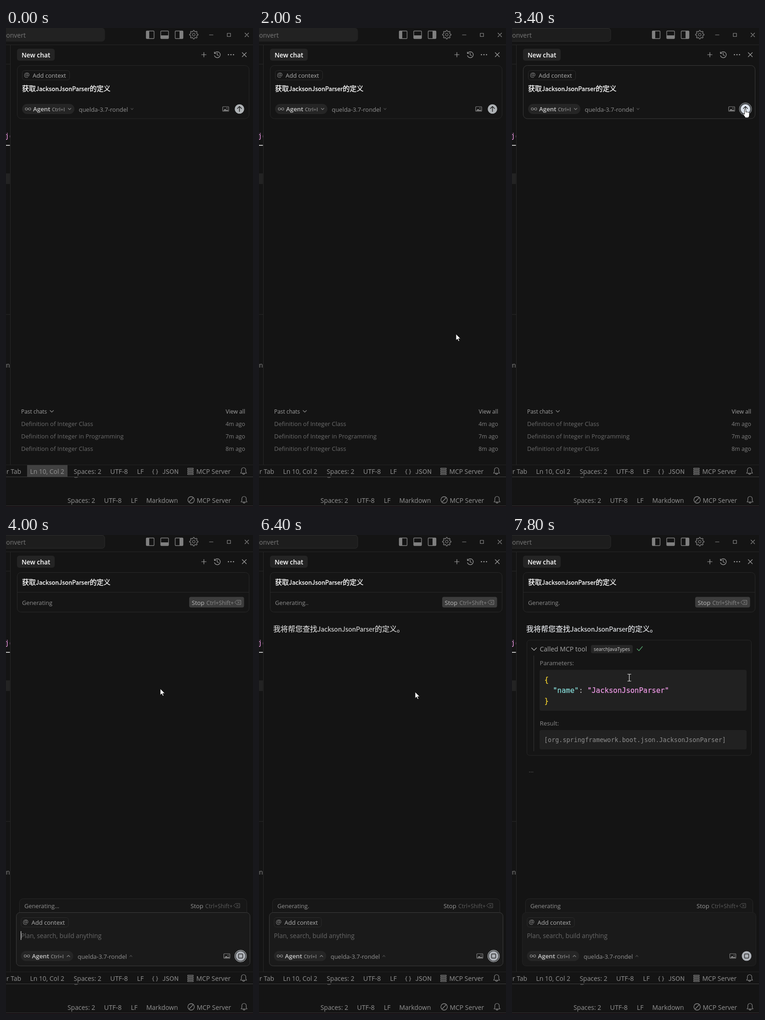
An HTML page for the animation above (8000 ms loop, 538x1041 px).

```html
<!DOCTYPE html>
<html lang="en">
<head>
<meta charset="utf-8">
<title>Agent chat</title>
<style>
html, body { margin: 0; width: 100%; height: 100%; overflow: hidden; background: #141414; }
svg { display: block; width: 538px; height: 1041px; }
text { font-family: "Open Sans", sans-serif; white-space: pre; }
.mono { font-family: "DejaVu Sans Mono", monospace; }
.cjk { font-family: "Noto Sans CJK SC", "Noto Sans CJK", sans-serif; }
.semi { font-weight: 600; }
.ico { fill: none; stroke: #8a8a8a; stroke-width: 1.2; stroke-linecap: round; stroke-linejoin: round; }
.dim { stroke: #747474; }
</style>
</head>
<body>
<svg id="stage" viewBox="0 0 538 1041" xmlns="http://www.w3.org/2000/svg"></svg>
<script>
const LOOP = 8000, STEP = 200;
const MODEL = 'quelda-3.7-rondel';

// Small markup helpers
const attrs = o => Object.entries(o).map(([k, v]) => ` ${k}="${v}"`).join('');
const text = (s, x, y, size, fill, more = {}) =>
  `<text x="${x}" y="${y}" font-size="${size}" fill="${fill}"${attrs(more)}>${s}</text>`;
const rect = (x, y, x2, y2, rx, fill, stroke = 'none', more = {}) =>
  `<rect x="${x}" y="${y}" width="${x2 - x}" height="${y2 - y}" rx="${rx}" fill="${fill}" stroke="${stroke}"${attrs(more)}/>`;
const path = (d, more = {}) => `<path class="ico" d="${d}"${attrs(more)}/>`;
const line = (d, stroke, width = 1) => `<path d="${d}" fill="none" stroke="${stroke}" stroke-width="${width}"/>`;
const group = (id, body) => `<g id="${id}">${body}</g>`;
// Chinese at the given size, Latin a little smaller
const mixed = (size, parts) => parts.map((s, i) =>
  `<tspan font-size="${i % 2 ? size * .87 : size}">${s}</tspan>`).join('');
const question = y => text(mixed(15, ['获取', 'JacksonJsonParser', '的定义']), 35, y, 15, '#fff',
  { class: 'cjk', stroke: '#fff', 'stroke-width': .3 });

const bell = (x, y) =>
  path(`M${x - 6.5} ${y + 5}h13l-1.700-3v-4.200a4.800 4.800 0 0 0-9.600 0v4.200zM${x - 2} ${y + 5.5}a2 2 0 0 0 4 0`);
const image = (x, y) =>
  rect(x - 6.5, y - 5, x + 6.5, y + 5, 1, 'none', '#888', { 'stroke-width': 1.2 }) +
  `<path d="M${x - 5.5} ${y + 4}l4-4.500 3 3 2-1.500 2.500 3z" fill="#888"/>` +
  `<circle cx="${x + 2.8}" cy="${y - 1.8}" r="1.100" fill="#888"/>`;
const erase = (x, y, color) =>
  path(`M${x + 4.5} ${y - 4.5}h8.500v9h-8.500l-4.500-4.500zM${x + 6} ${y - 2}l4 4m0-4l-4 4`, { style: `stroke:${color};stroke-width:1` });
const stopLabel = (x, y, main, soft) =>
  text('Stop', x, y, 13.1, main) + text('Ctrl+Shift+', x + 32, y, 12.2, soft) + erase(x + 94, y - 5, soft);
const chevron = (x, y, w, h, color) => path(`M${x - w} ${y - h}l${w} ${2 * h}l${w} ${-2 * h}`, { style: `stroke:${color}` });

// Context chip, mode pill and model picker; a negative bend turns the chevrons up
function controls(bend) {
  return rect(35.5, 92.5, 138.5, 113, 5, 'none', '#2b2b2b') +
    text('@', 39, 106.5, 14, '#8a8a8a') +
    text('Add context', 58, 107.5, 13, '#b0b0b0') +
    rect(35, 165, 149, 187, 11, '#252525') +
    path('M48 176c-2-3-6-3.600-6 0s4 3 6 0 6-3.600 6 0-4 3-6 0', { style: 'stroke:#999' }) +
    text('Agent', 59, 181, 13.3, '#cacaca', { class: 'semi' }) +
    text('Ctrl+I', 100, 181, 10.8, '#8a8a8a', { class: 'semi' }) +
    chevron(138.5, 176, 3, bend, '#808080') +
    text(MODEL, 158.5, 181.5, 12.95, '#929292') +
    chevron(274.5, 176, 2.5, bend, '#484848');
}

function titleBar() {
  const frame = x => rect(x, 6.5, x + 17, 23, 1.5, 'none', '#808080', { 'stroke-width': 1.4 });
  let teeth = '';
  for (let i = 0; i < 32; i++) {
    const a = (i - .5) * Math.PI / 16, r = i % 4 < 2 ? 9.3 : 7;
    teeth += `${i ? 'L' : 'M'}${(409 + r * Math.cos(a)).toFixed(1)} ${(14.5 + r * Math.sin(a)).toFixed(1)}`;
  }
  return rect(-20, .5, 215, 29, 6, '#222', '#222', { id: 'search' }) +
    text('convert', 43, 20.5, 14.1, '#787878', { 'text-anchor': 'end' }) +
    frame(305.5) + rect(306, 7, 312, 23, 0, '#808080') +
    frame(337) + rect(337, 16, 354, 23, 0, '#808080') +
    frame(368.5) + rect(378, 7, 385, 23, 0, '#808080') +
    path(teeth + 'z', { style: 'stroke:#787878;stroke-width:1.5' }) +
    '<circle cx="409" cy="14.500" r="2.800" class="ico dim"/>' +
    path('M443 15h8M482 11.500h7v7h-7zM520.500 11l8 8m0-8l-8 8', { class: 'ico dim' }) +
    line('M0 36.5H538', '#262626');
}

function editorEdge() {
  return line('M9.5 37V949M0 78.5H9M0 622.5H9', '#282828') +
    '<svg width="8.500" height="949" style="width:8.5px;height:949px">' +
    text('jc', -2.5, 240, 15.5, '#f09ae8', { class: 'mono' }) +
    rect(0, 316, 9, 339, 0, '#232323') + line('M0 255H9', '#bcbcbc', 2) + '</svg>' +
    text('n', 0, 738, 14, '#888');
}

function panelHeader() {
  return rect(24, 45, 106, 71, 5, '#242424') +
    text('New chat', 34, 63.5, 13.8, '#fff', { class: 'semi' }) +
    path('M426 58h10M431 53v10', { style: 'stroke:#a2a2a2' }) +
    path('M454.500 55a6.500 6.500 0 1 1-.5 5M454 52v3.500h3.500M460 54v4.500l3 1.500', { style: 'stroke:#a2a2a2' }) +
    [484.5, 490, 495.5].map(x => `<circle cx="${x}" cy="58" r="1.300" fill="#a8a8a8"/>`).join('') +
    path('M514.500 53.500l9 9m0-9l-9 9', { style: 'stroke:#a2a2a2' });
}

function statusBars() {
  const c = '#949494', s = (str, x, y, size = 13.9) => text(str, x, y, size, c);
  let server = '';
  for (let i = 0; i < 4; i++) server += `M396 ${956.5 + i * 4}h12v2.200h-12z`;
  return line('M0 949.5H538', '#242424') +
    rect(46, 950, 134, 975, 0, '#414141', 'none', { id: 'lnHover' }) +
    text('or Tab', 33, 968.5, 13.9, c, { 'text-anchor': 'end' }) +
    s('Ln 10, Col 2', 52.5, 968.5) + s('Spaces: 2', 147.5, 968.5) + s('UTF-8', 227, 968.5, 14.3) +
    s('LF', 285.5, 968.5) + s('{ }', 318, 967.5, 13.5) +
    text('JSON', 340.5, 968.5, 13.7, c, { class: 'cjk' }) +
    path(server, { style: 'stroke-width:1' }) + s('MCP Server', 414.5, 968.5) + bell(517.5, 962.5) +
    line('M0 975.5H538', '#3e3e3e') + line('M149 976.500q4 1.500 7-.5', '#777') +
    s('Spaces: 2', 134, 1031.5) + s('UTF-8', 213.5, 1031.5, 14.3) + s('LF', 272, 1031.5) +
    s('Markdown', 305.5, 1031.5) + s('MCP Server', 415.5, 1031.5) +
    path('M396.200 1025.500a7 7 0 1 0 14 0a7 7 0 1 0-14 0M398.500 1030.500l9.500-10', { style: 'stroke-width:1.3' }) +
    bell(518.5, 1025) + line('M0 1038.5H538', '#363636') + rect(0, 1039, 538, 1041, 0, '#150e12');
}

function draftView() {
  const row = (title, ago, y) => text(title, 33, y, 13.05, '#6c6c6c') +
    text(ago, 521, y - .5, 12.3, '#808080', { 'text-anchor': 'end' });
  return rect(24.5, 81.5, 529.5, 197, 9, '#151515', '#272727', { id: 'draftBox' }) +
    controls(1.5) + question(137) + image(478.5, 176) +
    '<circle id="sendRing" cx="508.500" cy="176" r="13.500" fill="#4a4d50" stroke="#85898c"/>' +
    '<circle id="send" cx="508.500" cy="176" r="10.300" fill="#aeb2b5"/>' +
    path('M508.500 181.500v-11m-4.500 4.500l4.500-4.500 4.500 4.500', { style: 'stroke:#1c1c1c;stroke-width:1.5' }) +
    text('Past chats', 33, 837.5, 11.9, '#a0a0a0') + chevron(99.7, 833, 3.7, 1.8, '#8a8a8a') +
    text('View all', 521, 837.5, 12.2, '#a0a0a0', { 'text-anchor': 'end' }) +
    row('Definition of Integer Class', '4m ago', 865) +
    row('Definition of Integer in Programming', '7m ago', 892) +
    row('Definition of Integer Class', '8m ago', 919);
}

function runView() {
  return rect(24.5, 81.5, 529.5, 167.5, 8, '#151515', '#292929') + line('M25 124.5H529', '#292929') +
    question(108) +
    text('', 35, 151.5, 12.75, '#8e8e8e', { id: 'topGen' }) +
    rect(399, 134.5, 518.5, 157.5, 4, '#3d3d3d') + stopLabel(404.5, 151.5, '#bababa', '#8a8a8a') +
    text('', 31, 209.5, 16, '#d6d6d6', { id: 'reply', class: 'cjk', 'stroke-width': .2 }) +
    rect(29.5, 790.5, 524.5, 830, 8, '#171717', '#272727') +
    text('', 40, 810.5, 12.75, '#929292', { id: 'lowGen' }) +
    stopLabel(402, 810.5, '#989898', '#5c5c5c') +
    rect(22.5, 820.5, 531.5, 936.5, 8, '#1a1a1a', '#3c3c3c', { id: 'box' }) +
    `<g transform="translate(-2.500 739)">${controls(-1.5)}</g>` +
    text('Plan, search, build anything', 32.5, 876, 13.75, '#686868') +
    rect(32, 861, 33.2, 880, 0, '#d8d8d8', 'none', { id: 'caret' }) +
    image(481, 915) +
    '<circle id="stopRing" cx="511" cy="915" r="12.500" fill="#2b2c2d" stroke="#a9adb0" stroke-width="1.300"/>' +
    '<circle cx="511" cy="915" r="10.500" fill="#aeb2b8"/>' +
    rect(506.5, 910.5, 515.5, 919.5, 1.5, 'none', '#2c2c2c', { 'stroke-width': 1.5 });
}

function toolCard() {
  const code = (s, y) => text(s, 70.5, y, 15.55, '#ccc', { class: 'mono' });
  const tint = (s, fill) => `<tspan fill="${fill}" stroke="${fill}" stroke-width=".25">${s}</tspan>`;
  return rect(32.5, 228.5, 521.5, 479, 6, '#151515', '#272727', { id: 'card' }) +
    group('fold', chevron(48, 248, 5.5, 2.7, '#b0b0b0')) +
    text('Called MCP tool', 60.5, 253, 14, '#aaa') +
    rect(172, 239, 263, 257, 4, '#272727') + text('searchJavaTypes', 178, 251.5, 10.35, '#d2d2d2') +
    path('M272.500 247.500l4 4 7.500-9', { style: 'stroke:#55a56c;stroke-width:1.4' }) +
    group('detail',
      line('M47.5 262V470', '#343434') +
      text('Parameters:', 60.5, 282.5, 13.2, '#8a8a8a') +
      rect(60, 293, 511, 382, 4, '#212121') +
      code(tint('{', '#f8d62e'), 320) +
      code(`  ${tint('"name"', '#86dcd8')}: ${tint('"JacksonJsonParser"', '#ee9ae6')}`, 343) +
      code(tint('}', '#f8d62e'), 366) +
      text('Result:', 60.5, 414, 13.3, '#8a8a8a') +
      rect(60, 424, 511, 466, 4, '#212121') +
      text('[org.springframework.boot.json.JacksonJsonParser]', 70, 450, 13.43, '#8e8e8e', { class: 'mono' })) +
    text('...', 36.5, 516, 13, '#686868', { id: 'wait' });
}

function pointers() {
  const edge = 'fill="#fff" stroke="#111" stroke-width="1" stroke-linejoin="round"';
  return group('arrow', `<path ${edge} d="M0 0v14l3.200-3 2.300 5 2.200-1-2.200-4.800h4.500z"/>`) +
    group('hand', `<path ${edge} d="M-1.500 2q1.500-3 3 0v6q1.500-1.500 2.500 0 1.500-1.200 2.500.4 2-1 2.500 1v5q0 4-3 5.600h-5.500l-5.500-8q0-2.500 3.500.5z"/>`) +
    group('beam', line('M-4-7.500h3q1 0 1 1 0-1 1-1h3M0-6.500v13M-4 7.500h3q1 0 1-1 0 1 1 1h3', '#e4e4e4', 1.2));
}

document.getElementById('stage').innerHTML =
  rect(0, 0, 538, 1041, 0, '#141414') + titleBar() + editorEdge() + panelHeader() + statusBars() +
  group('draft', draftView()) + group('run', runView()) + group('tool', toolCard()) + pointers();

const $ = id => document.getElementById(id);
const show = (id, on) => $(id).setAttribute('display', on ? 'inline' : 'none');
const paint = (id, name, value) => $(id).setAttribute(name, value);

// Pointer stops: time, x, y, kind
const stops = [
  [200, 170, 925, 'arrow'], [400, 300, 860, 'arrow'], [600, 415, 800, 'arrow'], [800, 480, 765, 'arrow'],
  [1000, 500, 759, 'arrow'], [1200, 508, 765, 'arrow'], [1400, 495, 745, 'arrow'], [1600, 465, 710, 'arrow'],
  [1800, 440, 680, 'arrow'], [2000, 429, 665, 'arrow'], [2200, 420, 440, 'arrow'], [2400, 395, 213, 'arrow'],
  [2600, 357, 134, 'beam'], [2800, 390, 145, 'beam'], [3000, 470, 180, 'arrow'], [3200, 508, 175, 'hand'],
  [3600, 505, 186, 'arrow'], [3800, 400, 280, 'arrow'], [4000, 336, 334, 'arrow'], [4600, 336, 339, 'arrow'],
  [5200, 337, 344, 'arrow'], [5800, 340, 341, 'arrow'], [6800, 300, 320, 'arrow'], [7000, 220, 275, 'arrow'],
  [7200, 140, 250, 'hand'], [7600, 205, 283, 'arrow'], [7800, 255.5, 310, 'beam']
];
const topDots = [[3600, 3], [4000, 0], [5000, 1], [6200, 2], [7000, 3], [7400, 0], [7800, 1]];
const lowDots = [[3600, 2], [4000, 3], [5000, 0], [6200, 1], [6800, 2], [7200, 3], [7600, 0]];
const at = (table, t) => table.filter(row => row[0] <= t).pop();

function draw(t) {
  const running = t >= 3600, clicked = t >= 3400, hover = t >= 3200, called = t >= 6800, open = t >= 7400;
  show('lnHover', t < 200);
  paint('search', 'fill', clicked ? '#1d1d1d' : '#222');
  paint('search', 'stroke', clicked ? '#2d2d2d' : '#222');
  paint('draftBox', 'stroke', clicked ? '#3a3a3a' : '#272727');
  paint('send', 'fill', hover ? '#dce3ec' : '#aeb2b5');
  show('sendRing', hover);
  show('draft', !running);
  show('run', running);
  show('tool', called);

  if (running) {
    $('topGen').textContent = 'Generating' + '.'.repeat(at(topDots, t)[1]);
    $('lowGen').textContent = 'Generating' + '.'.repeat(at(lowDots, t)[1]);
    const parts = t < 6200 ? [] : t < 6400 ? ['我将帮您查找'] : ['我将帮您查找', 'JacksonJsonParser', '的定义。'];
    $('reply').innerHTML = mixed(16, parts);
    for (const name of ['fill', 'stroke']) paint('reply', name, called ? '#e6e8ec' : '#d6d6d6');
    show('caret', !open && t > 3600 && (t - 3610) % 1000 < 500);
    show('stopRing', !open);
    paint('box', 'stroke', open ? '#232323' : '#3c3c3c');
    show('detail', open);
    paint('card', 'height', open ? 250.5 : 39);
    paint('fold', 'transform', open ? '' : 'rotate(-90 48 248)');
    paint('wait', 'y', open ? 516 : 305);
  }

  const p = at(stops, t);
  for (const kind of ['arrow', 'hand', 'beam']) show(kind, p && p[3] === kind);
  if (p) paint(p[3], 'transform', `translate(${p[1]} ${p[2]})`);
}

const start = performance.now();
let last = -1;
function tick() {
  const t = Math.floor(((performance.now() - start) % LOOP) / STEP) * STEP;
  if (t !== last) draw(last = t);
  requestAnimationFrame(tick);
}
draw(0);
tick();
</script>
</body>
</html>
```
